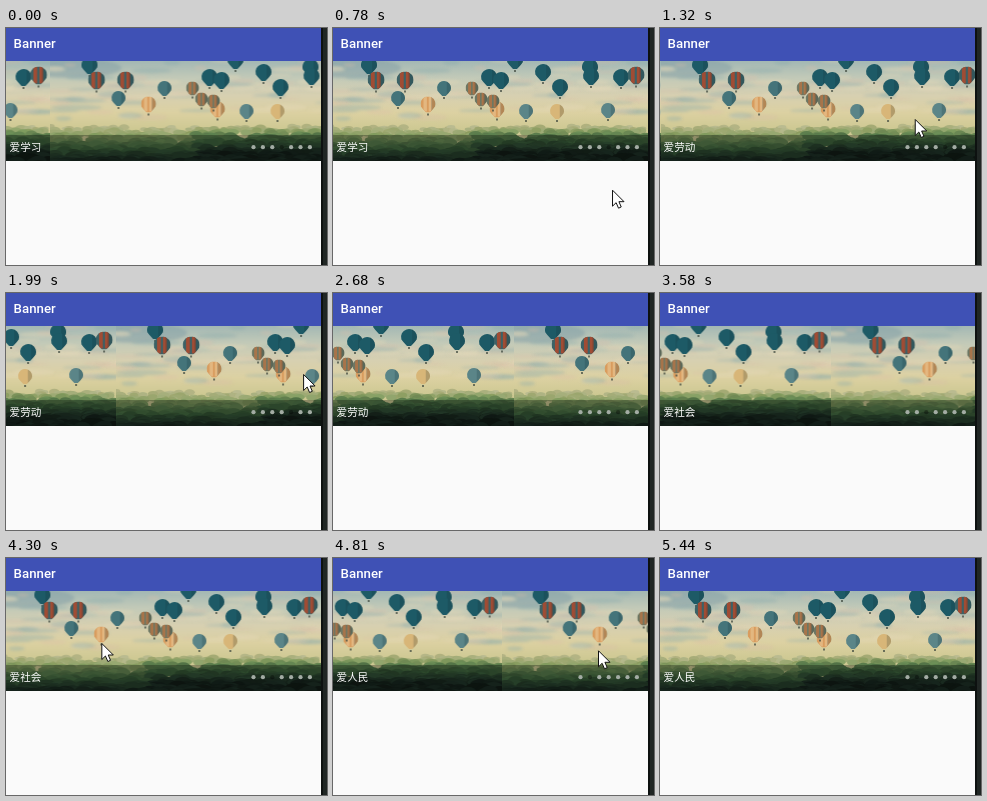
Recreate the animation shown at these times as an HTML page with a canvas. Size 321 px wide and 237 px high, loop 5.56 s.

```html
<!DOCTYPE html>
<html lang="zh">
<head>
<meta charset="utf-8">
<style>
html, body { margin: 0; width: 100%; height: 100%; overflow: hidden; background: #fafafa; }
canvas { display: block; width: 321px; height: 237px; }
</style>
</head>
<body>
<canvas id="stage" width="321" height="237"></canvas>
<script>
const W = 321, H = 237, PAGE = 318, LEFT = -3, RIGHT = 315, TOP = 33, BOTTOM = 133;
const LOOP = 5560;
const ctx = document.getElementById('stage').getContext('2d');

const titles = ['', '爱人民', '爱社会', '爱学习', '爱劳动'];

const linear = p => p;
const settle = p => 1 - (1 - p) ** 3;

// Pager moves: start, duration, distance, easing, change of page
const moves = [
  [0, 270, -48, settle, 0],
  [930, 510, -PAGE, settle, 1],
  [1600, 390, 113, linear, 0],
  [1990, 690, 71, linear, 0],
  [2700, 350, PAGE - 184, settle, -1],
  [3280, 300, 173, linear, 0],
  [3580, 300, PAGE - 173, settle, -1],
  [4300, 510, 170, linear, 0],
  [4810, 270, PAGE - 170, settle, -1]
];

// Pointer way points: time, x, y
const path = [[270, 310, 236], [930, 270, 140], [1320, 255, 91], [1600, 184, 88], [1990, 297, 81],
  [2680, 368, 84], [3280, 160, 86], [3580, 333, 86], [4150, 95, 85], [4300, 95, 85],
  [4810, 265, 92], [5320, 272, 240]];

// Balloon kinds: radius, colour, stripe, places
const balloons = [
  [7, '#5b8588', '', [[193, 84], [275, 83]]],
  [7, '#d8b678', '', [[224, 84]]],
  [7.5, '#d99c5e', '#e3b780', [[95, 77], [164, 82]]],
  [6.5, '#6d7763', '#a8744a', [[139, 61], [148, 72], [160, 74]]],
  [7, '#44747a', '', [[65, 71], [111, 61]]],
  [8, '#1d5a66', '', [[36, 38], [156, 50], [168, 53], [182, 33], [210, 45], [227, 60], [257, 40], [258, 49], [288, 50]]],
  [8.5, '#3a6267', '#a04c34', [[43, 53], [72, 53], [303, 48]]]
];

function seeded(seed) {
  return () => (seed = seed * 16807 % 2147483647) / 2147483647;
}

function blob(c, x, y, rx, ry, color) {
  c.fillStyle = color;
  c.beginPath();
  c.ellipse(x, y, rx, ry, 0, 0, 7);
  c.fill();
}

function box(c, color, x, y, w, h) {
  c.fillStyle = color;
  c.fillRect(x, y, w, h);
}

function balloon(c, x, y, r, color, stripe) {
  c.save();
  c.beginPath();
  c.arc(x, y - 1, r, Math.PI * 0.9, Math.PI * 2.1);
  c.quadraticCurveTo(x + r * 0.75, y + r * 0.5, x + r * 0.25, y + r);
  c.lineTo(x - r * 0.25, y + r);
  c.quadraticCurveTo(x - r * 0.75, y + r * 0.5, x - r * 0.95, y + r * 0.2);
  c.clip();
  box(c, color, x - r, y - r - 1, r * 2, r * 2 + 1);
  if (stripe) {
    for (const k of [-0.6, 0.1]) box(c, stripe, x + k * r, y - r - 1, r * 0.45, r * 2);
  }
  box(c, 'rgba(20,45,50,.2)', x + r * 0.4, y - r - 1, r, r * 2 + 1);
  c.restore();
  box(c, 'rgba(60,70,60,.7)', x - 1, y + r + 1, 2, 2);
}

function paintSky(c) {
  const g = c.createLinearGradient(0, TOP, 0, 102);
  ['#a3b8b4', '#c3cab8', '#d7d0b1', '#dcd1a2', '#cdc892']
    .forEach((color, i) => g.addColorStop(i / 4, color));
  box(c, g, LEFT, TOP, PAGE, 100);

  const rnd = seeded(77);
  const tints = ['rgba(230,218,184,.4)', 'rgba(135,168,172,.35)', 'rgba(217,190,170,.3)'];
  c.filter = 'blur(1.5px)';
  blob(c, 18, 40, 50, 10, 'rgba(130,158,165,.5)');
  for (let i = 0; i < 75; i++) {
    blob(c, rnd() * PAGE, TOP + rnd() * 58, 6 + rnd() * 20, 1 + rnd() * 2, tints[i % 3]);
  }
  c.filter = 'none';
}

// Crowns from the pale far woods to the dark near ones, denser on the right
function paintWoods(c) {
  const rnd = seeded(31), count = 900;
  for (let i = 0; i < count; i++) {
    const near = i / count, x = LEFT + rnd() * PAGE;
    const y = 98 + near * 38 + rnd() * 3, r = 2 + near * 4 + rnd() * 2;
    const depth = Math.min(1, near + (x > 140 ? 0.22 * Math.min(1, near * 4) : 0));
    const light = 63 - 51 * depth + (rnd() - 0.5) * 7;
    blob(c, x, y, r * 1.4, r * 0.8, `hsl(${60 + depth * 90} 24% ${light}%)`);
  }
}

function paintScene() {
  const cv = document.createElement('canvas');
  cv.width = PAGE;
  cv.height = BOTTOM - TOP;
  const c = cv.getContext('2d');
  c.translate(-LEFT, -TOP);
  paintSky(c);
  for (const [r, color, stripe, places] of balloons) {
    places.forEach(([x, y]) => balloon(c, x, y, r, color, stripe));
  }
  paintWoods(c);
  return cv;
}

function arrow(x, y) {
  ctx.save();
  ctx.translate(x + 0.5, y + 0.5);
  ctx.beginPath();
  [[0, 0], [0, 16], [3.6, 12.5], [6, 18], [8.7, 16.8], [6.4, 11.5], [11.5, 11.5]]
    .forEach(p => ctx.lineTo(...p));
  ctx.closePath();
  ctx.fillStyle = '#fff';
  ctx.fill();
  ctx.strokeStyle = '#111';
  ctx.stroke();
  ctx.restore();
}

function pager(t) {
  let shift = 48, index = 3;
  for (const [start, length, distance, ease, turn] of moves) {
    if (t < start) break;
    shift += distance * ease(Math.min(1, (t - start) / length));
    index += turn;
  }
  return { shift: (shift + 2 * PAGE) % PAGE, index };
}

function drawPointer(t) {
  const n = path.findIndex(p => p[0] > t);
  if (n < 1) return;
  const [t0, x0, y0] = path[n - 1], [t1, x1, y1] = path[n];
  const p = (t - t0) / (t1 - t0), x = x0 + (x1 - x0) * p;
  if (x < RIGHT) arrow(x, y0 + (y1 - y0) * p);
}

function text(s, font, x, y) {
  ctx.fillStyle = '#fff';
  ctx.font = font;
  ctx.fillText(s, x, y);
}

const scene = paintScene();

function draw(t) {
  const { shift, index } = pager(t);
  box(ctx, '#fafafa', 0, 0, W, H);
  ctx.drawImage(scene, shift + LEFT, TOP);
  ctx.drawImage(scene, shift + LEFT - PAGE, TOP);

  box(ctx, 'rgba(0,0,0,.3)', 0, 107, RIGHT, BOTTOM - 107);
  text(titles[index], '10.6px "Noto Sans CJK SC", "Noto Sans CJK", sans-serif', 3.6, 123);
  for (let i = 0; i < 7; i++) {
    blob(ctx, 247.5 + i * 9.4, 119.2, 2.1, 2.1, i === index ? 'rgba(0,0,0,.35)' : '#a3aca4');
  }

  box(ctx, '#3f51b5', 0, 0, RIGHT, TOP);
  text('Banner', '500 13.25px Roboto, sans-serif', 7.6, 20);
  box(ctx, '#0d1110', RIGHT, 0, 2, H);
  box(ctx, '#202624', RIGHT + 2, 0, W - RIGHT - 2, H);
  drawPointer(t);
}

const start = performance.now();
function run() {
  draw((performance.now() - start) % LOOP);
  requestAnimationFrame(run);
}
run();
</script>
</body>
</html>
```
